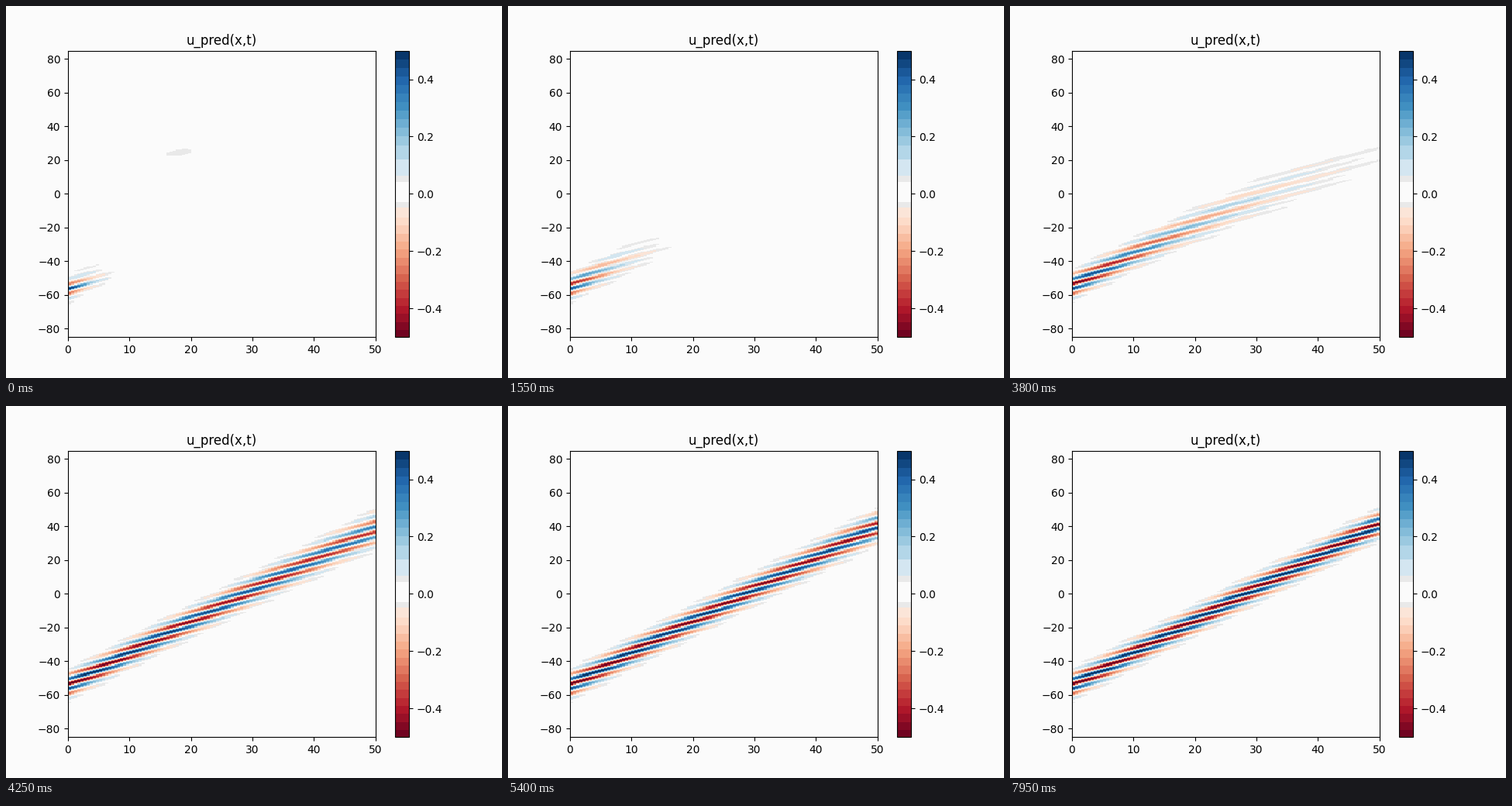
These frames come from a looping animation (640x480 px, 8000 ms). A matplotlib script:

```python
import matplotlib.pyplot as plt
import numpy as np
from matplotlib.animation import FuncAnimation
from matplotlib.colors import ListedColormap

FRAMES, INTERVAL = 160, 50
T_MAX, X_MAX, U_MAX = 50, 85, 0.5
PAPER = "#fbfbfb"
PERIOD = 5.95          # wavelength of the carrier
CREST = -53.4          # position of the deepest trough at t = 0
PHASE_SPEED, GROUP_SPEED = 0.936, 1.916

t, x = np.meshgrid(np.linspace(0, T_MAX, 100), np.linspace(-X_MAX, X_MAX, 340))


def banded_map(n=1000):
    """RdBu in flat steps, with a near-white centre edged in grey."""
    low = [0.028, 0.048, *np.arange(0.083, 0.5, 0.028)]
    high = [0.042, 0.063, 0.12, *np.arange(0.17, 0.5, 0.03)]
    edges = np.array([-U_MAX, *[-v for v in reversed(low)], *high, U_MAX])
    mids = (edges[:-1] + edges[1:]) / 2
    colors = plt.get_cmap("RdBu")(mids + 0.5)
    centre = len(low)
    colors[centre, :3] = 251 / 255
    colors[[centre - 1, centre + 1], :3] = 233 / 255
    values = (np.arange(n) + 0.5) / n - 0.5
    return ListedColormap(colors[np.searchsorted(edges, values) - 1])


def damping(ms):
    """Loss per unit t: shrinks slowly, then drops when the fit locks on."""
    locked = 1 / (1 + np.exp((4050 - ms) / 50))
    return 0.27 * np.exp(-ms / 2040) * (1 - 0.75 * locked)


def field(ms):
    # Everything that is still wrong in the fit scales with the damping.
    r = damping(ms)
    along = x - CREST - PHASE_SPEED * t
    cycles = along / PERIOD - 0.0136 * r * np.maximum(along, 0) ** 2
    middle = -54.1 - 10 * r + GROUP_SPEED * t - 0.17 * r * t**2
    spread = 41 + 1.5 * r * t**2

    packet = (0.53 - r) * np.exp(-((x - middle) ** 2) / spread)
    spike = 0.24 * np.exp(-ms / 800) * np.exp(-((along + 3) ** 2) / 5)
    u = -(packet + spike) * np.exp(-((r * t) ** 1.3)) * np.cos(2 * np.pi * cycles)

    # faint stray patch that soon vanishes
    dt = t - 18
    dx = x - 24.4 - 0.5 * dt
    patch = np.exp(-0.27 * ((dt / 2.1) ** 2 + (dx / 1.8) ** 2))
    return u + 0.055 * max(0, 1 - ms / 600) * patch


fig, ax = plt.subplots(figsize=(6.4, 4.8), dpi=100, facecolor=PAPER)
image = ax.imshow(field(0), cmap=banded_map(), vmin=-U_MAX, vmax=U_MAX,
                  extent=(0, T_MAX, -X_MAX, X_MAX), origin="lower",
                  aspect="auto", interpolation="nearest")
ax.set_facecolor(PAPER)
ax.set_title("u_pred(x,t)")
fig.colorbar(image, ax=ax)


def update(frame):
    image.set_data(field(frame * INTERVAL))
    return (image,)


anim = FuncAnimation(fig, update, frames=FRAMES, interval=INTERVAL,
                     repeat=True, repeat_delay=0)
plt.show()
```
